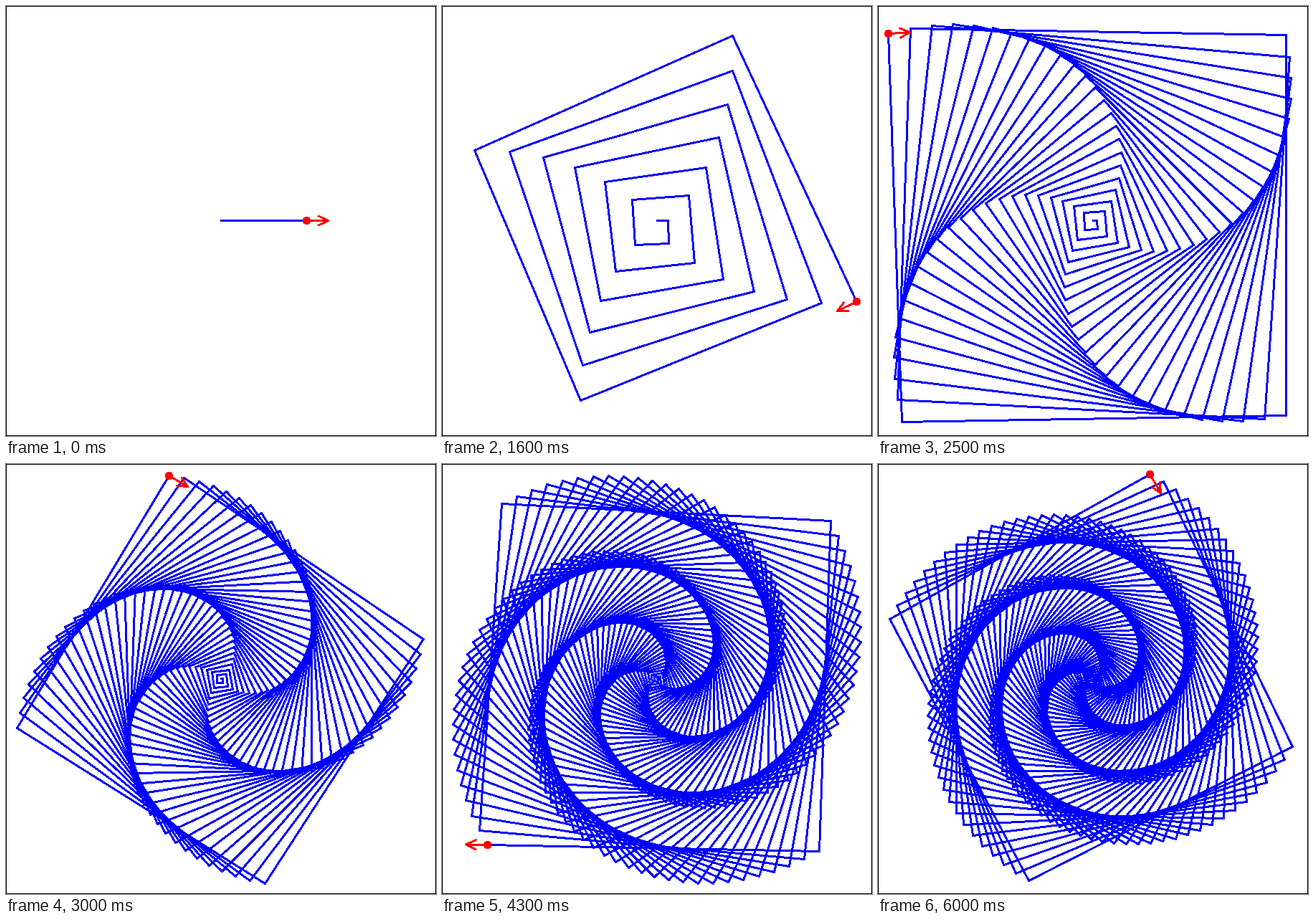
Animation, 600 px wide and 600 px high, one loop 6100 ms. Source, as an HTML page:

```html
<!DOCTYPE html>
<html lang="en">
<head>
<meta charset="utf-8">
<title>Turtle spiral</title>
<style>
  html, body { margin: 0; width: 100%; height: 100%; overflow: hidden; background: #fff; }
  svg { display: block; shape-rendering: crispEdges; }
  path, rect { fill: none; stroke-width: 3; stroke-linecap: round; stroke-linejoin: round; }
  rect { stroke: #000; stroke-width: 1; }
  #trail { stroke: #00f; }
  #arrow { stroke: #f00; }
  circle { fill: #f00; }
</style>
</head>
<body>
<svg width="600" height="600" viewBox="0 0 600 600">
  <rect x="0.5" y="0.5" width="599" height="599"/>
  <path id="trail"/>
  <g id="turtle">
    <path id="arrow" d="M0 0H30M16.5 -6.5L30 0L16.5 6.5"/>
    <circle r="5.8"/>
  </g>
</svg>
<script>
const trail = document.getElementById('trail');
const turtle = document.getElementById('turtle');
const TURN = 89;
const TICK = 100, TICKS = 61, MID = 30, ACTIONS = 600;
const SPAN = 599, MARGIN = 1.05, MIN_VIEW = 2.5;

// Turtle path: move n units, turn, move n + 1 units, ...
// reach[n] is the largest coordinate met after n moves.
const path = [[0, 0]], reach = [0];
for (let n = 1; n <= ACTIONS / 2 + 1; n++) {
  const [px, py] = path[n - 1], a = TURN * (n - 1) * Math.PI / 180;
  const x = px + n * Math.cos(a), y = py + n * Math.sin(a);
  path.push([x, y]);
  reach.push(Math.max(reach[n - 1], Math.abs(x), Math.abs(y)));
}

// Actions (a move or a turn) done per tick: speeds up to the middle, then mirrored.
const gains = [1, 1, 1, 1, 1, 1, 2, 2, 3, 3, 4, 4, 5, 7, 7,
  8, 10, 11, 13, 14, 15, 16, 17, 18, 20, 21, 22, 23, 24, 24];
const done = [1];
gains.forEach((g, i) => done.push(done[i] + g));

function actionsAt(tick) {
  return tick <= MID ? done[tick] : ACTIONS + 1 - done[TICKS - 1 - tick];
}

function draw(tick) {
  const actions = actionsAt(tick);
  const moves = Math.ceil(actions / 2), turns = actions - moves;
  // Keep the drawing, and the point the turtle faces next, in view.
  const next = turns === moves ? reach[moves + 1] : 0;
  const view = Math.max(MIN_VIEW, MARGIN * reach[moves], next);
  // Snap to whole pixels; rows are counted from the bottom.
  const snap = v => Math.round(SPAN / 2 * (1 + v / view));
  const points = path.slice(0, moves + 1)
    .map(([x, y]) => [snap(x) + 0.5, SPAN - snap(-y) + 0.5]);

  trail.setAttribute('d', 'M' + points.join('L'));
  turtle.setAttribute('transform', `translate(${points[moves]}) rotate(${TURN * turns})`);
}

const start = performance.now();
let shown = -1;
function loop() {
  const tick = Math.floor((performance.now() - start) / TICK) % TICKS;
  if (tick !== shown) draw(shown = tick);
  requestAnimationFrame(loop);
}
loop();
</script>
</body>
</html>
```
